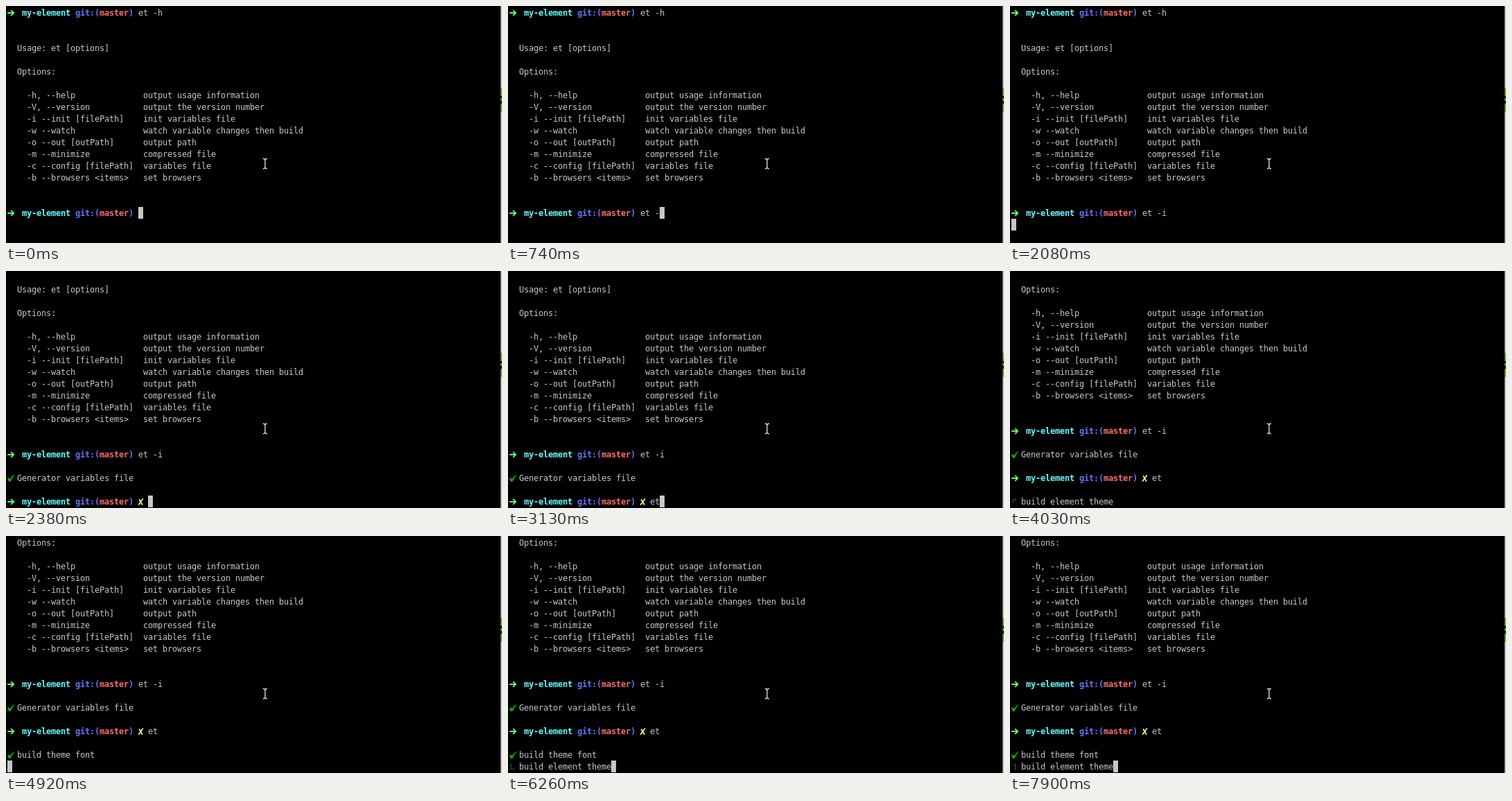
An HTML page with a canvas that plays this animation: 716 by 342 pixels, repeating every 8000 ms.

```html
<!DOCTYPE html>
<html lang="en">
<head>
<meta charset="utf-8">
<title>Terminal session</title>
<style>
  html, body { margin: 0; width: 100%; height: 100%; overflow: hidden; background: #000; }
  canvas { display: block; width: 716px; height: 342px; }
</style>
</head>
<body>
<canvas id="stage" width="716" height="342"></canvas>
<script>
const ctx = document.getElementById('stage').getContext('2d');
const W = 716, H = 342, LOOP = 8000;
const CELL = 7, ROW = 17, LEFT = 2, TOP = 1, BASE = 13;
const MONO = '12px "DejaVu Sans Mono", monospace';
const C = {
  text: '#c7c7c7', lime: '#5ffa68', aqua: '#60fdff', blue: '#6871ff',
  red: '#ff6e67', yellow: '#fffc67', green: '#00c200', teal: '#00c5c7'
};

const OPTIONS = [
  ['-h, --help', 'output usage information'],
  ['-V, --version', 'output the version number'],
  ['-i --init [filePath]', 'init variables file'],
  ['-w --watch', 'watch variable changes then build'],
  ['-o --out [outPath]', 'output path'],
  ['-m --minimize', 'compressed file'],
  ['-c --config [filePath]', 'variables file'],
  ['-b --browsers <items>', 'set browsers']
];

// [start time, value] steps
const SCROLL = [[0, 0], [2380, 2], [3580, 3], [4030, 4], [4920, 5]];
const FIRST = [[0, ''], [450, 'e'], [600, 'et'], [740, 'et -'], [1780, 'et -i']];
const SECOND = [[0, ''], [2980, 'e'], [3130, 'et']];

// Symbols, relative to the top left of their cell
const ARROW = new Path2D('M1 9H9M5.8 5.6L9.2 9L5.8 12.4');
const CHECK = new Path2D('M.2 9.6Q1.6 8 2.6 9L3.6 11Q6 6.4 9.9 4L10.3 4.6Q7 8 4.6 13.4Q3 14.5 2.2 13.4Z');
const CROSS = new Path2D('M.6 13L6.4 5M1.6 6L5.6 13');

// Braille spinner: bits 0-2 left column, bits 3-5 right column
const SPIN = [0x0b, 0x19, 0x39, 0x38, 0x3c, 0x34, 0x26, 0x27, 0x07, 0x0f];

let scroll = 0;

const at = (steps, t) => steps.reduce((v, [start, next]) => t >= start ? next : v, steps[0][1]);
const px = col => LEFT + col * CELL;
const py = line => TOP + (line - scroll) * ROW;

// One glyph per terminal cell
function put(str, col, line, color = C.text, weight = '') {
  ctx.font = weight + ' ' + MONO;
  ctx.fillStyle = color;
  [...str].forEach((ch, i) => ctx.fillText(ch, px(col + i), py(line) + BASE));
}

function symbol(path, col, line, color, width) {
  ctx.save();
  ctx.translate(px(col), py(line));
  ctx.fillStyle = ctx.strokeStyle = color;
  ctx.lineCap = ctx.lineJoin = 'round';
  ctx.lineWidth = width;
  if (width) ctx.stroke(path);
  else ctx.fill(path);
  ctx.restore();
}

function prompt(line, typed, dirty) {
  symbol(ARROW, 0, line, C.lime, 2);
  put('my-element', 3, line, C.aqua, 'bold');
  put('git:(', 14, line, C.blue, 'bold');
  put('master', 19, line, C.red, 'bold');
  put(')', 25, line, C.blue, 'bold');
  if (dirty) symbol(CROSS, 27, line, C.yellow, 1.7);
  put(typed, dirty ? 29 : 27, line);
}

function done(str, line) {
  symbol(CHECK, 0, line, C.green);
  put(str, 2, line);
}

function cursor(col, line) {
  ctx.fillStyle = C.text;
  ctx.fillRect(px(col), py(line), CELL, ROW);
}

function spinner(step, line) {
  const bits = SPIN[step % SPIN.length];
  ctx.fillStyle = C.teal;
  for (let i = 0; i < 6; i++) {
    if (bits >> i & 1) ctx.fillRect(i < 3 ? 3.7 : 7, py(line) + 5.3 + i % 3 * 3, 1.4, 1.4);
  }
}

function spinStep(t) {
  if (t < 4770) return 0;
  if (t < 4920) return 1;
  const ticks = (from, to) => Math.floor((Math.min(Math.max(t, from), to) - from + 5) / 149);
  return 3 + 2 * (ticks(5070, 5670) + ticks(5811, 6560) + ticks(7011, 7900));
}

function help() {
  put('Usage: et [options]', 2, 3);
  put('Options:', 2, 5);
  OPTIONS.forEach(([flag, info], i) => {
    put(flag, 4, 7 + i);
    put(info, 28, 7 + i);
  });
}

function session(t) {
  scroll = at(SCROLL, t);
  const first = at(FIRST, t), second = at(SECOND, t);
  prompt(0, 'et -h');
  help();
  prompt(17, first);
  if (t < 2080) return cursor(27 + first.length, 17);
  if (t < 2380) return cursor(0, 18);
  done('Generator variables file', 19);
  prompt(21, second, true);
  if (t < 3580) return cursor(29 + second.length, 21);
  if (t < 4030) return cursor(0, 22);
  const last = t < 4920 ? 23 : 24;
  if (last === 24) done('build theme font', 23);
  if (t >= 4920 && t < 5070) return cursor(0, 24);
  spinner(spinStep(t), last);
  put('build element theme', 2, last);
  if (last === 24) cursor(21, last);
}

function edge() {
  const bar = (color, y, h) => {
    ctx.fillStyle = color;
    ctx.fillRect(714, y, 2, h);
  };
  bar('#bebebe', 0, H);
  bar('#68a836', 118, 35);
  bar('#1c2418', 130, 3);
  bar('#1c2418', 137, 4);
}

function pointer() {
  const x = 374, y = 227.5;
  ctx.strokeStyle = '#d4d4d4';
  ctx.lineWidth = 1.4;
  ctx.beginPath();
  for (const s of [-1, 1]) {
    for (const side of [-3, 3]) {
      ctx.moveTo(x + side, y + 7.2 * s);
      ctx.quadraticCurveTo(x, y + 7.2 * s, x, y + 5 * s);
    }
  }
  ctx.moveTo(x, y - 5);
  ctx.lineTo(x, y + 5);
  ctx.stroke();
}

function draw(now) {
  ctx.fillStyle = '#000';
  ctx.fillRect(0, 0, W, H);
  session(now % LOOP);
  edge();
  pointer();
  requestAnimationFrame(draw);
}

draw(performance.now());
</script>
</body>
</html>
```
